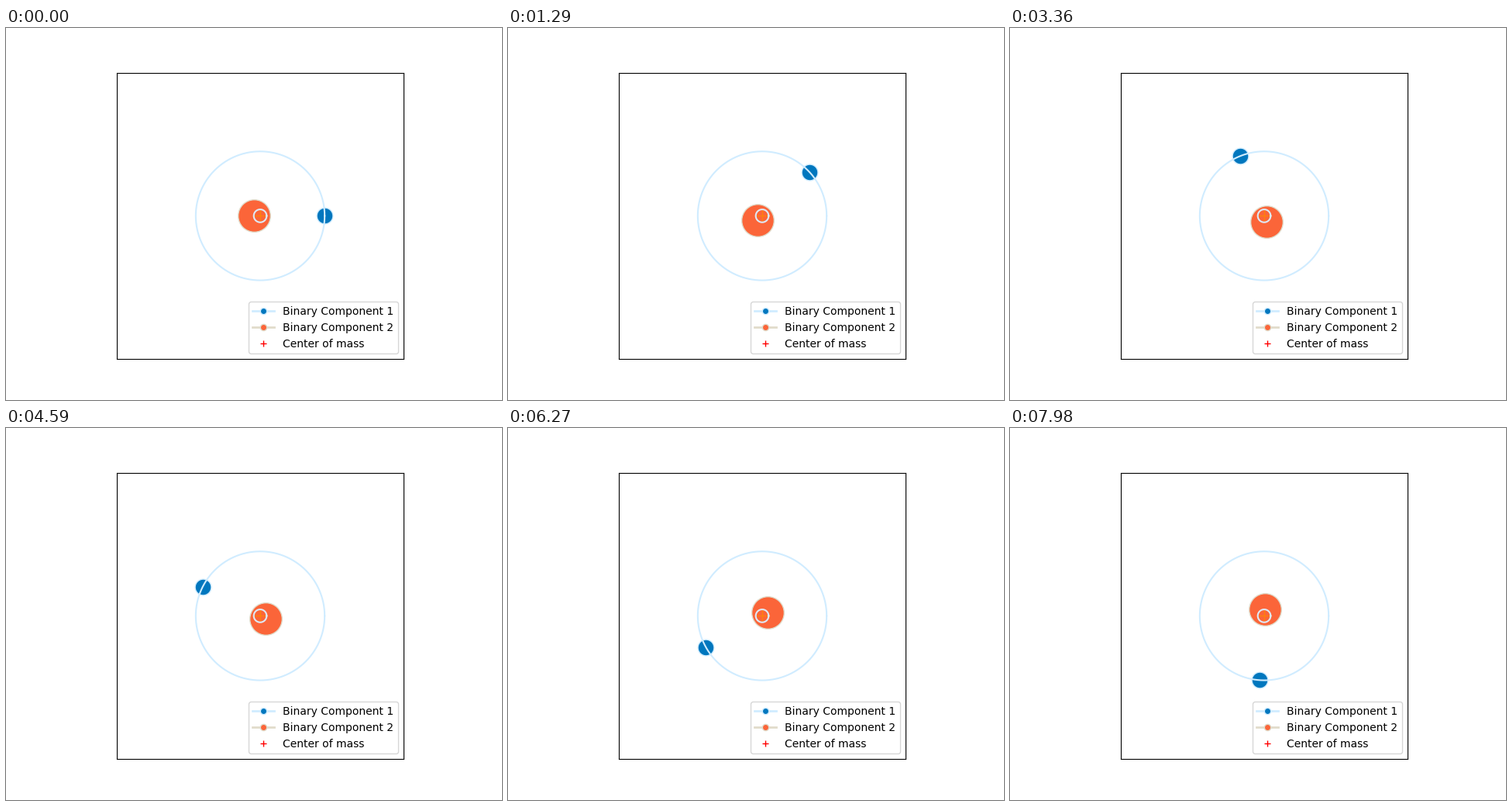
These frames come from a looping animation (640 by 480 pixels, 8 s). A matplotlib script:

```python
import numpy as np
import matplotlib.pyplot as plt
from matplotlib.animation import FuncAnimation
from matplotlib.lines import Line2D

BLUE, PALE_BLUE = "#0077be", "#d0ecff"
ORANGE, BEIGE = "#fb6539", "#e1dccb"
RING = "#dfe8f5"
R1, R2 = 0.9, 0.09
FRAMES, INTERVAL = 267, 30

fig, ax = plt.subplots(figsize=(6.4, 4.8), dpi=100)
ax.set_aspect("equal")
ax.set(xlim=(-2, 2), ylim=(-2, 2), xticks=[], yticks=[])


def body(size, face, edge, zorder):
    return ax.plot([], [], "o", ms=size, mfc=face, mec=edge, mew=1, zorder=zorder)[0]


def orbit(radius, color):
    t = np.linspace(0, 2 * np.pi, 361)
    ax.plot(radius * np.cos(t), radius * np.sin(t), color=color, lw=1.5, zorder=4)


def key(label, face, edge):
    return Line2D([], [], color=edge, lw=2, marker="o", mfc=face, mec=edge,
                  label=label)


star1 = body(15, BLUE, PALE_BLUE, 2)
star2 = body(30, ORANGE, BEIGE, 2)
ax.plot(0, 0, "+", color="#ff7f0e", ms=12, zorder=3)
orbit(R1, PALE_BLUE)
orbit(R2, RING)

ax.legend(
    handles=[
        key("Binary Component 1", BLUE, PALE_BLUE),
        key("Binary Component 2", ORANGE, BEIGE),
        Line2D([], [], color="red", marker="+", ls="none", label="Center of mass"),
    ],
    loc="lower right",
)


def update(i):
    # one degree per step, the two bodies always opposite each other
    a = np.radians(i)
    x, y = np.cos(a), np.sin(a)
    star1.set_data([R1 * x], [R1 * y])
    star2.set_data([-R2 * x], [-R2 * y])
    return star1, star2


anim = FuncAnimation(fig, update, frames=FRAMES, interval=INTERVAL,
                     repeat=True, repeat_delay=0)
plt.show()
```
